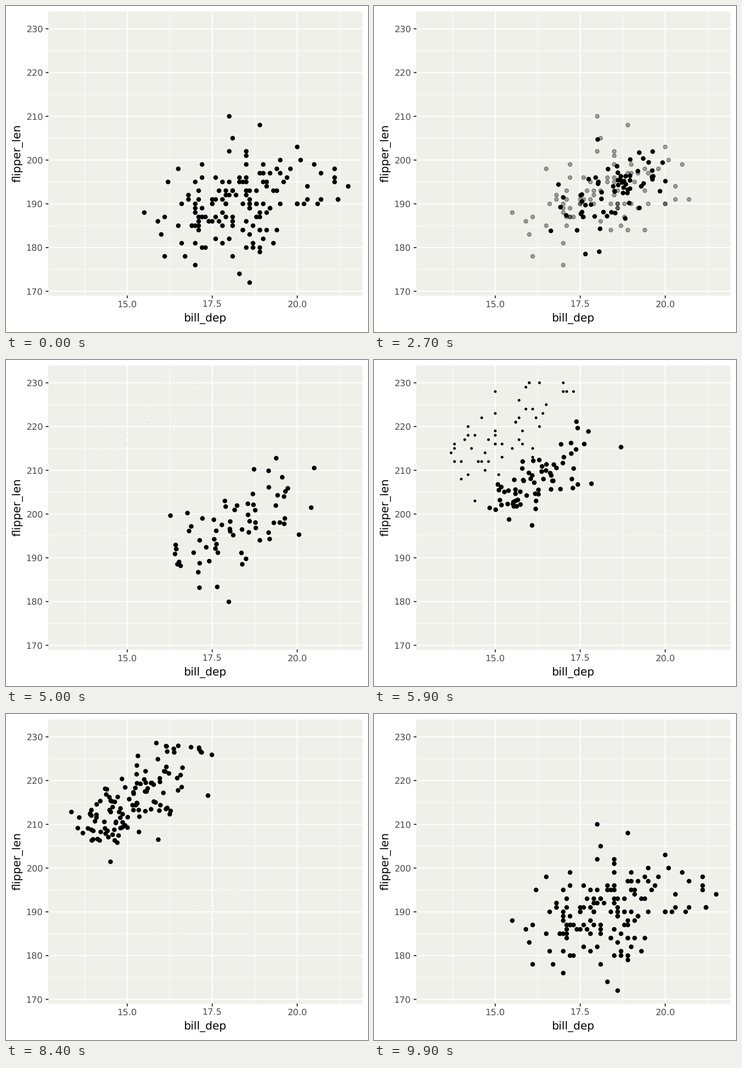
These frames come from a looping animation (789x710 px, 10000 ms). A matplotlib script:

```python
import matplotlib.pyplot as plt
import numpy as np
from matplotlib.animation import FuncAnimation

plt.rcParams.update({"font.family": "DejaVu Sans", "text.hinting": "none"})

W, H, DPI = 789, 710, 100
LEFT, RIGHT, TOP, BOTTOM = 92.5, 777.0, 12.0, 630.5
X_MIN, X_MAX = 12.68, 21.92
Y_MIN, Y_MAX = 169.05, 233.95
FRAMES, STEP_MS = 100, 100
NA = np.nan


def pt(v):
    """Plot points (157.8 per inch canvas) to figure points."""
    return v * 1.578


def px(x):
    return LEFT + (x - X_MIN) / (X_MAX - X_MIN) * (RIGHT - LEFT)


def py(y):
    return BOTTOM - (y - Y_MIN) / (Y_MAX - Y_MIN) * (BOTTOM - TOP)


def survey(depth, flipper):
    return np.column_stack([depth, flipper])


# Penguin measurements: bill depth (mm) and flipper length (mm)
adelie_2007 = survey(
    [18.7, 17.4, 18, NA, 19.3, 20.6, 17.8, 19.6, 18.1, 20.2,
     17.1, 17.3, 17.6, 21.2, 21.1, 17.8, 19, 20.7, 18.4, 21.5,
     18.3, 18.7, 19.2, 18.1, 17.2, 18.9, 18.6, 17.9, 18.6, 18.9,
     16.7, 18.1, 17.8, 18.9, 17, 21.1, 20, 18.5, 19.3, 19.1,
     18, 18.4, 18.5, 19.7, 16.9, 18.8, 19, 18.9, 17.9, 21.2],
    [181, 186, 195, NA, 193, 190, 181, 195, 193, 190,
     186, 180, 182, 191, 198, 185, 195, 197, 184, 194,
     174, 180, 189, 185, 180, 187, 183, 187, 172, 180,
     178, 178, 188, 184, 195, 196, 190, 180, 181, 184,
     182, 195, 186, 196, 185, 190, 182, 179, 190, 191])
adelie_2008 = survey(
    [17.7, 18.9, 17.9, 19.5, 18.1, 18.6, 17.5, 18.8, 16.6, 19.1,
     16.9, 21.1, 17, 18.2, 17.1, 18, 16.2, 19.1, 16.6, 19.4,
     19, 18.4, 17.2, 18.9, 17.5, 18.5, 16.8, 19.4, 16.1, 19.1,
     17.2, 17.6, 18.8, 19.4, 17.8, 20.3, 19.5, 18.6, 19.2, 18.8,
     18, 18.1, 17.1, 18.1, 17.3, 18.9, 18.6, 18.5, 16.1, 18.5],
    [186, 188, 190, 200, 187, 191, 186, 193, 181, 194,
     185, 195, 185, 192, 184, 192, 195, 188, 190, 198,
     190, 190, 196, 197, 190, 195, 191, 184, 187, 195,
     189, 196, 187, 193, 191, 194, 190, 189, 189, 190,
     202, 205, 185, 186, 187, 208, 190, 196, 178, 192])
adelie_2009 = survey(
    [17.9, 20, 16, 20, 18.6, 18.9, 17.2, 20, 17, 19,
     16.5, 20.3, 17.7, 19.5, 20.7, 18.3, 17, 20.5, 17, 18.6,
     17.2, 19.8, 17, 18.5, 15.9, 19, 17.6, 18.3, 17.1, 18,
     17.9, 19.2, 18.5, 18.5, 17.6, 17.5, 17.5, 20.1, 16.5, 17.9,
     17.1, 17.2, 15.5, 17, 16.8, 18.7, 18.6, 18.4, 17.8, 18.1,
     17.1, 18.5],
    [192, 203, 183, 190, 193, 184, 199, 190, 181, 197,
     198, 191, 193, 197, 191, 196, 188, 199, 189, 189,
     187, 198, 176, 202, 186, 199, 191, 195, 191, 210,
     190, 197, 193, 199, 187, 190, 191, 200, 185, 193,
     193, 187, 188, 190, 192, 185, 190, 184, 195, 193,
     187, 201])
adelie = np.vstack([adelie_2007, adelie_2008, adelie_2009])

chinstrap = survey(
    [17.9, 19.5, 19.2, 18.7, 19.8, 17.8, 18.2, 18.2, 18.9, 19.9,
     17.8, 20.3, 17.3, 18.1, 17.1, 19.6, 20, 17.8, 18.6, 18.2,
     17.3, 17.5, 16.6, 19.4, 17.9, 19, 18.4, 19, 17.8, 20,
     16.6, 20.8, 16.7, 18.8, 18.6, 16.8, 18.3, 20.7, 16.6, 19.9,
     19.5, 17.5, 19.1, 17, 17.9, 18.5, 17.9, 19.6, 18.7, 17.3,
     16.4, 19, 17.3, 19.7, 17.3, 18.8, 16.6, 19.9, 18.8, 19.4,
     19.5, 16.5, 17, 19.8, 18.1, 18.2, 19, 18.7],
    [192, 196, 193, 188, 197, 198, 178, 197, 195, 198,
     193, 194, 185, 201, 190, 201, 197, 181, 190, 195,
     181, 191, 187, 193, 195, 197, 200, 200, 191, 205,
     187, 201, 187, 203, 195, 199, 195, 210, 192, 205,
     210, 187, 196, 196, 196, 201, 190, 212, 187, 198,
     199, 201, 193, 203, 187, 197, 191, 203, 202, 194,
     206, 189, 195, 207, 202, 193, 210, 198])

gentoo = survey(
    [13.2, 16.3, 14.1, 15.2, 14.5, 13.5, 14.6, 15.3, 13.4, 15.4,
     13.7, 16.1, 13.7, 14.6, 14.6, 15.7, 13.5, 15.2, 14.5, 15.1,
     14.3, 14.5, 14.5, 15.8, 13.1, 15.1, 14.3, 15, 14.3, 15.3,
     15.3, 14.2, 14.5, 17, 14.8, 16.3, 13.7, 17.3, 13.6, 15.7,
     13.7, 16, 13.7, 15, 15.9, 13.9, 13.9, 15.9, 13.3, 15.8,
     14.2, 14.1, 14.4, 15, 14.4, 15.4, 13.9, 15, 14.5, 15.3,
     13.8, 14.9, 13.9, 15.7, 14.2, 16.8, 14.4, 16.2, 14.2, 15,
     15, 15.6, 15.6, 14.8, 15, 16, 14.2, 16.3, 13.8, 16.4,
     14.5, 15.6, 14.6, 15.9, 13.8, 17.3, 14.4, 14.2, 14, 17,
     15, 17.1, 14.5, 16.1, 14.7, 15.7, 15.8, 14.6, 14.4, 16.5,
     15, 17, 15.5, 15, 13.8, 16.1, 14.7, 15.8, 14, 15.1,
     15.2, 15.9, 15.2, 16.3, 14.1, 16, 15.7, 16.2, 13.7, NA,
     14.3, 15.7, 14.8, 16.1],
    [211, 230, 210, 218, 215, 210, 211, 219, 209, 215,
     214, 216, 214, 213, 210, 217, 210, 221, 209, 222,
     218, 215, 213, 215, 215, 215, 216, 215, 210, 220,
     222, 209, 207, 230, 220, 220, 213, 219, 208, 208,
     208, 225, 210, 216, 222, 217, 210, 225, 213, 215,
     210, 220, 210, 225, 217, 220, 208, 220, 208, 224,
     208, 221, 214, 231, 219, 230, 214, 229, 220, 223,
     216, 221, 221, 217, 216, 230, 209, 220, 215, 223,
     212, 221, 212, 224, 212, 228, 218, 218, 212, 230,
     218, 228, 212, 224, 214, 226, 216, 222, 203, 225,
     219, 228, 215, 228, 216, 215, 210, 219, 208, 209,
     216, 229, 213, 230, 217, 230, 217, 222, 214, NA,
     215, 222, 212, 213])

# (rest ends, next rest begins, from, to)
MOVES = [(16, 33, adelie, chinstrap),
         (49, 66, chinstrap, gentoo),
         (83, 99, gentoo, adelie)]


def tween(a, b, p):
    """Rows pair up in order; spare ones fade out, new ones grow in."""
    n = min(len(a), len(b))
    shared = a[:n] + (b[:n] - a[:n]) * p
    rows = np.vstack([shared, a[n:], b[n:]])
    alpha, scale = np.ones(len(rows)), np.ones(len(rows))
    if len(a) > n:
        alpha[n:] = 1 - p
    else:
        scale[n:] = p
    return rows, alpha, scale


def scene(k):
    rows = adelie
    for start, end, a, b in MOVES:
        if start < k < end:
            return tween(a, b, (k - start) / (end - start))
        if k >= end:
            rows = b
    return rows, np.ones(len(rows)), np.ones(len(rows))


fig = plt.figure(figsize=(W / DPI, H / DPI), dpi=DPI, facecolor="white")
ax = fig.add_axes([0, 0, 1, 1])
ax.set_xlim(0, W)
ax.set_ylim(H, 0)
ax.axis("off")

ax.add_patch(plt.Rectangle((LEFT, TOP), RIGHT - LEFT, BOTTOM - TOP,
                           fc="#eff0ea", lw=0, zorder=0))


def grid(xs, ys, width, z):
    style = dict(colors="white", linewidths=pt(width), snap=False, zorder=z)
    ax.hlines(py(ys), LEFT, RIGHT, **style)
    ax.vlines(px(xs), TOP, BOTTOM, **style)


x_ticks = np.array([15, 17.5, 20])
y_ticks = np.arange(170, 231, 10)
grid(np.arange(13.75, 21.5, 2.5), np.arange(175, 226, 10), 0.533, 1)
grid(x_ticks, y_ticks, 1.067, 2)

tick = dict(colors="#333333", linewidths=pt(1.067), snap=False)
ax.hlines(py(y_ticks), LEFT - pt(2.75) / 0.72, LEFT, **tick)
ax.vlines(px(x_ticks), BOTTOM, BOTTOM + pt(2.75) / 0.72, **tick)

label = dict(size=pt(8.8), color="#4d4d4d", va="baseline")
for v in y_ticks:
    ax.text(81, py(v) + 7, f"{v}", ha="right", **label)
for v in x_ticks:
    ax.text(px(v), 655.6, f"{v:.1f}", ha="center", **label)

title = dict(size=pt(11), color="black", ha="center", va="baseline")
ax.text((LEFT + RIGHT) / 2, 686, "bill_dep", **title)
ax.text(30.5, (TOP + BOTTOM) / 2, "\ufb02ipper_len", rotation=90,
        rotation_mode="anchor", **title)

dots = ax.scatter([], [], zorder=3)


def draw(k):
    rows, alpha, scale = scene(k)
    seen = np.isfinite(rows[:, 0])
    rows, alpha, scale = rows[seen], alpha[seen], scale[seen]
    ink = np.zeros((len(rows), 4))
    ink[:, 3] = alpha
    dots.set_offsets(np.column_stack([px(rows[:, 0]), py(rows[:, 1])]))
    dots.set_sizes((pt(3.91) * scale) ** 2, dpi=DPI)
    dots.set_linewidths(pt(0.709) * scale)
    dots.set_facecolors(ink)
    dots.set_edgecolors(ink)
    return dots,


anim = FuncAnimation(fig, draw, frames=FRAMES, interval=STEP_MS,
                     init_func=lambda: draw(0), repeat=True, repeat_delay=0)
plt.show()
```
